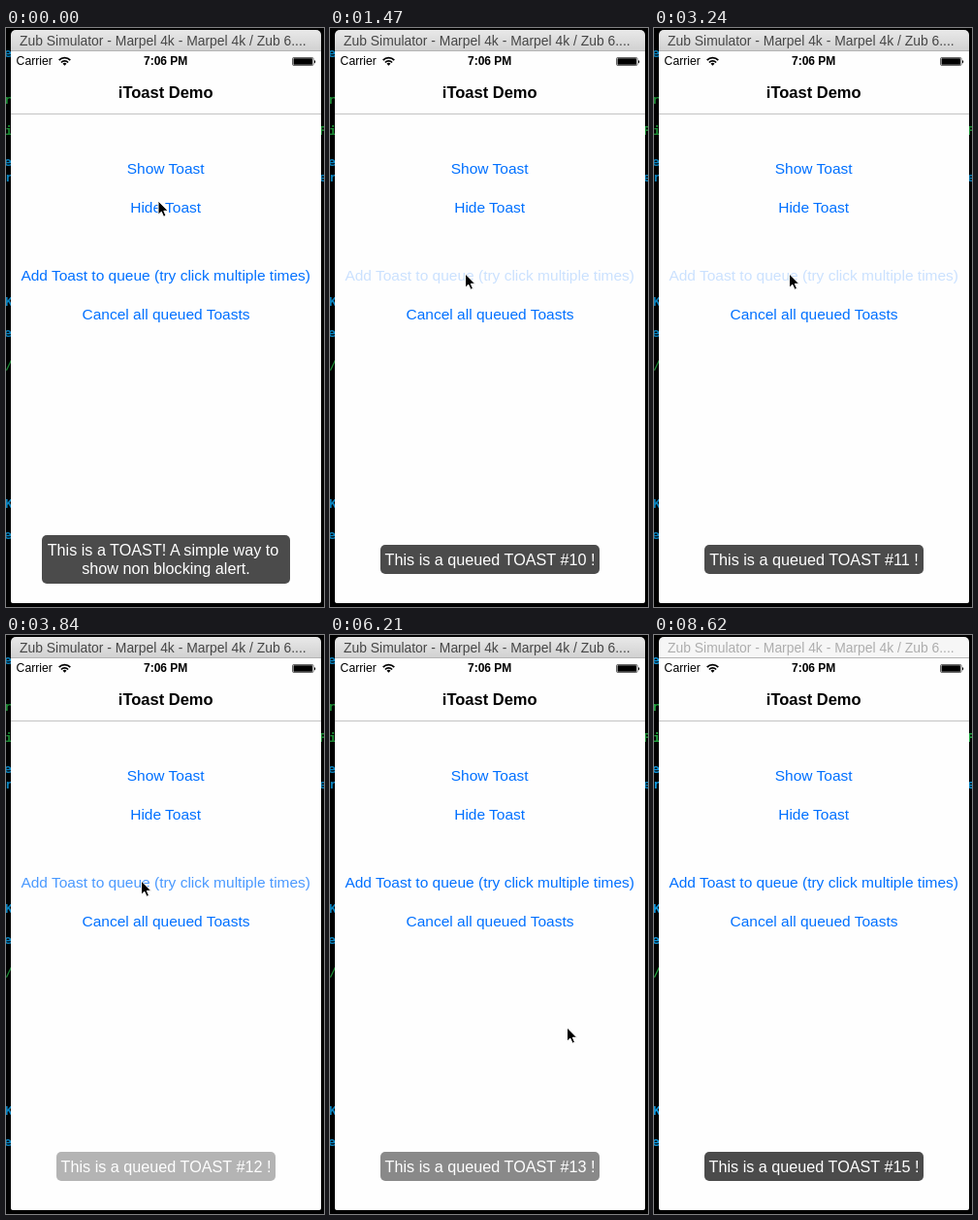
Animation, 328 px wide and 596 px high, one loop 8.72 s. Source, as an HTML page:

```html
<!DOCTYPE html>
<html lang="en">
<head>
<meta charset="utf-8">
<title>iToast Demo</title>
<style>
  html, body { margin: 0; width: 100%; height: 100%; overflow: hidden; background: #000; }
  svg { display: block; width: 328px; height: 596px; }
  text { font-family: "Liberation Sans", Arial, sans-serif; }
  .mid { text-anchor: middle; }
  .code text { font: bold 13px "DejaVu Sans Mono", monospace; }
  .blue { fill: #0a84c0; }
  .green { fill: #1c8a34; }
  .inactive .blue { fill: #109ae0; }
  .inactive .green { fill: #22a440; }
  .bar { fill: url(#active); }
  .caption { font-size: 13.9px; fill: #464646; }
  .inactive .bar { fill: #f6f6f6; }
  .inactive .caption { fill: #adadad; }
  .status { font-size: 12.2px; }
  .link { font-size: 15.5px; fill: #0070ff; }
  .toast rect { fill: #000; fill-opacity: .7; }
  .toast text { font-size: 16.2px; fill: #fff; }
</style>
</head>
<body>
<svg id="stage" viewBox="0 0 328 596">
  <defs>
    <linearGradient id="active" x2="0" y2="1">
      <stop stop-color="#e9e9e9"/><stop offset="1" stop-color="#d0d0d0"/>
    </linearGradient>
  </defs>
  <rect width="328" height="596"/>
  <g id="code" class="code"></g>

  <!-- window -->
  <path d="M5 24H325V590a2 2 0 0 1-2 2H7a2 2 0 0 1-2-2Z" fill="#fefefe"/>
  <path class="bar" d="M5 24V7a5 5 0 0 1 5-5H320a5 5 0 0 1 5 5V24Z"/>
  <path d="M5 23.5H325" stroke="#b4b4b4"/>
  <text class="caption" x="14" y="18.3">Zub Simulator - Marpel 4k - Marpel 4k / Zub 6....</text>

  <!-- status and navigation bars -->
  <text class="status" x="10.6" y="38.4">Carrier</text>
  <g fill="none" stroke="#000" stroke-width="1.7">
    <path d="M54.7 33.2a8 8 0 0 1 11.6 0M56.9 35.5a5 5 0 0 1 7.2 0"/>
    <path d="M60.5 38.8L58.5 36.8a2.9 2.9 0 0 1 4 0Z" fill="#000" stroke="none"/>
  </g>
  <text class="status mid" x="164.7" y="38.4" font-weight="bold" style="font-size:12px">7:06 PM</text>
  <rect x="295.5" y="30.5" width="21.5" height="8" rx="1.2" fill="none" stroke="#000" stroke-opacity=".6"/>
  <rect x="296.5" y="31.2" width="19.5" height="6.6" rx=".5"/>
  <path d="M318 33a1.8 1.8 0 0 1 0 3.4Z"/>
  <text class="mid" x="164.7" y="72" font-size="16.5" font-weight="bold">iToast Demo</text>
  <path d="M5 88.5H325" stroke="#c4c4c4"/>

  <g class="link mid">
    <text x="164.7" y="150">Show Toast</text>
    <text x="164.7" y="190">Hide Toast</text>
    <text id="add" x="164.7" y="260">Add Toast to queue (try click multiple times)</text>
    <text x="165" y="300">Cancel all queued Toasts</text>
  </g>

  <g id="intro" class="toast mid">
    <rect x="37" y="522" width="256" height="50" rx="5"/>
    <text x="162" y="543.3">This is a TOAST! A simple way to</text>
    <text x="165" y="562.3">show non blocking alert.</text>
  </g>
  <g id="queued" class="toast mid">
    <rect x="52" y="532" width="226" height="30" rx="5"/>
    <text id="label" x="165" y="553"></text>
  </g>

  <path id="cursor" d="M0 0V14.2L3.3 11.2L5.6 16.3L8 15.2L5.8 10.3H10.2Z"
        stroke="#fff" stroke-width="1" stroke-linejoin="round"/>
</svg>

<script>
const LOOP = 8720, TICK = 147.8, LEAD = 12;
const FADE = 200, PERIOD = 1288.5, FIRST_SWAP = 983.5;
const el = id => document.getElementById(id);

// code behind the window: x, baseline, glyph, colour
const glyphs = [
  [-2, 30, 'e', 'blue'], [-2, 78, 'r', 'green'], [-1, 110, 'i', 'green'],
  [-2, 142, 'e', 'blue'], [-1, 158, 'r', 'blue'], [-1, 286, 'K', 'blue'],
  [-2, 318, 'e', 'blue'], [-1, 351, '/', 'green'], [-1, 494, 'K', 'blue'],
  [-2, 526, 'e', 'blue'], [323, 110, 'F', 'green'], [323, 158, 'e', 'blue']
];
el('code').innerHTML = glyphs.map(([x, y, c, tone]) =>
  `<text x="${x}" y="${y}" class="${tone}">${c}</text>`).join('');

// keys: time, then values
const path = [
  [0, 157, 178], [60, 157, 178], [720, 139.5, 253], [4320, 139.5, 253],
  [4800, 244.5, 404], [6400, 244.5, 404], [7050, 300, 597]
];
const press = [
  [0, 1], [800, 1], [1030, .2], [1060, .2], [1200, .7], [1300, .6], [1470, .2],
  [1880, .2], [2430, 1], [3000, 1], [3200, .2], [3500, .2], [4080, 1]
];

function sample(keys, t) {
  const next = keys.findIndex(key => key[0] > t);
  if (next < 0) return keys.at(-1).slice(1);
  const [t0, ...from] = keys[next - 1], [t1, ...to] = keys[next];
  const u = (t - t0) / (t1 - t0), eased = u * u * (3 - 2 * u);
  return from.map((v, i) => v + (to[i] - v) * eased);
}

function drawToast(t) {
  const swaps = Math.floor((t - FIRST_SWAP) / PERIOD);
  const age = t - FIRST_SWAP - swaps * PERIOD;
  const leaving = age < FADE;
  const index = leaving ? swaps : swaps + 1;
  const fadeIn = Math.min(1, age / FADE - 1);
  const opacity = swaps < 0 ? 1 : leaving ? 1 - age / FADE : fadeIn;
  const isIntro = index <= 0;
  el('intro').setAttribute('opacity', isIntro ? opacity : 0);
  el('queued').setAttribute('opacity', isIntro ? 0 : opacity);
  el('label').textContent = `This is a queued TOAST #${9 + index} !`;
}

function draw(time) {
  const t = Math.floor((time + LEAD) / TICK) * TICK;
  drawToast(t);
  el('add').setAttribute('opacity', sample(press, t)[0]);
  const [x, y] = sample(path, t);
  el('cursor').setAttribute('transform', `translate(${x} ${y})`);
  el('cursor').setAttribute('visibility', t < 7050 ? 'visible' : 'hidden');
  el('stage').classList.toggle('inactive', time >= 8620);
}

const start = performance.now();
function frame() {
  draw((performance.now() - start) % LOOP);
  requestAnimationFrame(frame);
}
frame();
</script>
</body>
</html>
```
